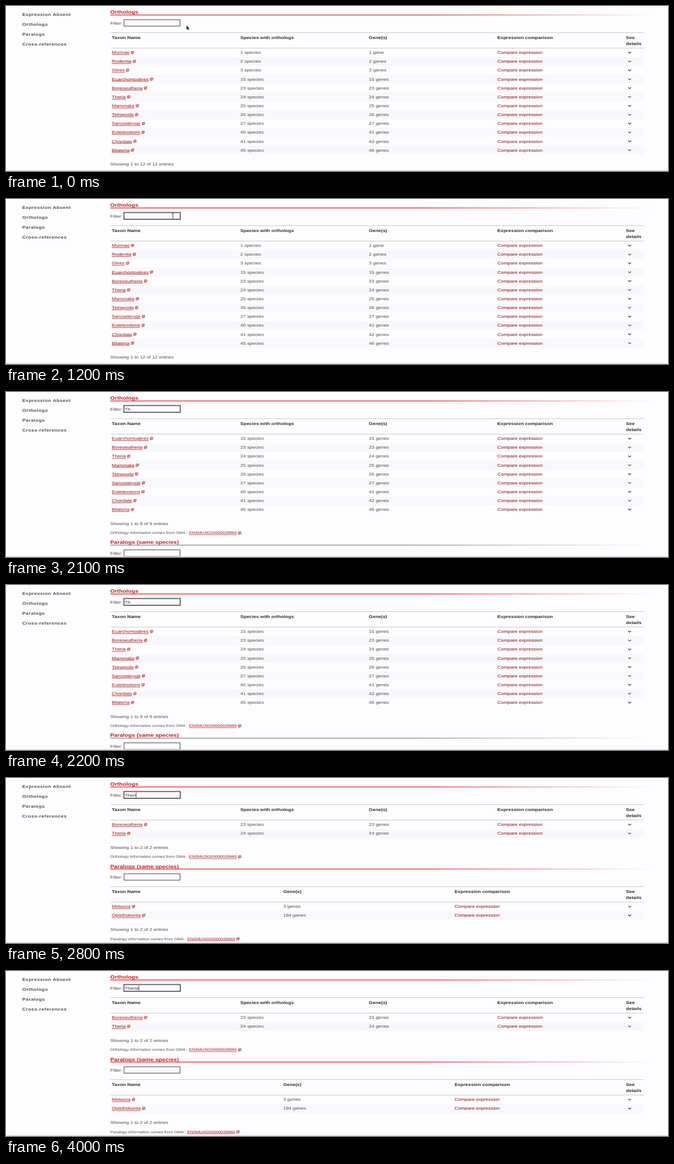
Animation of 1200x300 px, one loop 4.1 s. Source, as an HTML page:

```html
<!DOCTYPE html>
<html lang="en">
<head>
<meta charset="utf-8">
<title>Ortholog filter</title>
<style>
  html, body { margin: 0; width: 100%; height: 100%; overflow: hidden; background: #fdfcfe; }
  svg { display: block; width: 1200px; height: 300px; }
  text { font: 7.4px "Liberation Sans", Arial, sans-serif; fill: #4d4b4e; text-rendering: geometricPrecision; white-space: pre; }
  .head { font-weight: bold; fill: #2b292c; }
  .side { font-weight: bold; letter-spacing: .4px; }
  .title { font-weight: bold; font-size: 8.9px; fill: #c0201f; }
  .link { fill: #9c1216; text-decoration: underline; }
  .compare { fill: #7c0a10; }
  .small { font-size: 6.45px; }
  .typed { fill: #333; }
</style>
</head>
<body>
<svg viewBox="0 0 1200 300">
  <defs>
    <linearGradient id="red" gradientUnits="userSpaceOnUse" x1="189" x2="1172">
      <stop offset=".58" stop-color="#d8242a"/><stop offset="1" stop-color="#d8242a" stop-opacity="0"/>
    </linearGradient>
    <linearGradient id="gray" gradientUnits="userSpaceOnUse" x1="189" x2="1172">
      <stop offset=".55" stop-color="#8b8587"/><stop offset="1" stop-color="#8b8587" stop-opacity="0"/>
    </linearGradient>
    <g id="icon" fill="none" stroke="#a8383b" stroke-width=".75">
      <path d="M1.6 .5H5.4V4H1.6ZM1.6 1.6H.4V5.1H4.2V4M2.5 3.2L4.3 1.5M2.9 1.5H4.3V2.9"/>
    </g>
    <path id="chevron" d="M-2.7 -1.1L0 1.1L2.7 -1.1" fill="none" stroke="#333" stroke-width="1.1"/>
    <path id="arrow" d="M0 0V8L2 6.6L3.2 9.2L4.7 8.7L3.6 6.1H6Z" fill="#111" stroke="#fff" stroke-width=".5"/>
    <path id="beam" d="M-2 -4H-.7L0 -3.4L.7 -4H2M0 -3.4V3.4M-2 4H-.7L0 3.4L.7 4H2" fill="none" stroke="#222" stroke-width=".9"/>
  </defs>
  <g id="scene"></g>
</svg>
<script>
const LOOP = 4100, STEP = 100, WIDE = 1.2, ROW = 16.13;
const scene = document.getElementById('scene');
const pen = document.createElement('canvas').getContext('2d');
pen.font = '100px "Liberation Sans", Arial, sans-serif';

const taxa = [
  ['Murinae', 1, 1], ['Rodentia', 2, 2], ['Glires', 3, 3], ['Euarchontoglires', 15, 15],
  ['Boreoeutheria', 23, 23], ['Theria', 24, 24], ['Mammalia', 25, 25], ['Tetrapoda', 26, 26],
  ['Sarcopterygii', 27, 27], ['Euteleostomi', 40, 41], ['Chordata', 41, 42], ['Bilateria', 45, 46]
].map(([name, species, genes]) =>
  [name, species + ' species', genes + (genes > 1 ? ' genes' : ' gene'), 'Compare expression']);
const paralogs = [['Metazoa', '3 genes', 'Compare expression'], ['Opisthokonta', '184 genes', 'Compare expression']];

// [start, typed text, matching rows]
const typing = [
  [0, '', taxa],
  [2000, 'T', taxa],
  [2100, 'Th', taxa.slice(3)],
  [2400, 'The', [4, 5, 9, 10, 11].map(i => taxa[i])],
  [2600, 'Ther', [4, 5, 9, 10, 11].map(i => taxa[i])],
  [2800, 'Theri', taxa.slice(4, 6)],
  [2900, 'Theria', taxa.slice(4, 6)]
];
// [start, shape, x, y]
const pointer = [
  [0, 'arrow', 327, 35.2], [100, 'arrow', 320, 34], [200, 'beam', 309, 31],
  [500, 'beam', 302.5, 30.2], [2000, '', 0, 0]
];
const at = (list, t) => list.filter(e => e[0] <= t).pop();

const width = (s, size = 7.4) => pen.measureText(s).width * size / 100 * WIDE;
const text = (x, y, s, cls = '') => `<text class="${cls}" transform="matrix(${WIDE} 0 0 1 ${x} ${y})">${s}</text>`;
const use = (id, x, y) => `<use href="#${id}" x="${x}" y="${y}"/>`;
const rect = (x, y, w, h, fill, more = '') => `<rect x="${x}" y="${y}" width="${w}" height="${h}" fill="${fill}" ${more}/>`;

function info(y, kind) {
  const lead = kind + ' information comes from OMA : ', id = 'ENSMUSG00000028969';
  const x = 189 + width(lead, 6.45), end = x + width(id, 6.45);
  return text(189, y, lead, 'small') + text(x, y, id, 'link small') +
    use('icon', end + 2.2, y - 5) + text(end + 8, y, '.', 'small');
}

function section(top, title, kind, heads, rows, line, input) {
  const pitch = 932 / heads.length, count = rows.length;
  let out = text(189, top + 14.4, title, 'title') + rect(189, top + 15.7, 983, 1.3, `url(#${line})`);
  out += text(189, top + 33.7, 'Filter:');
  if (input.focus) out += rect(213.4, top + 24.3, 102.7, 12.9, 'none', 'stroke="#8d8b92" stroke-width="1.6"');
  out += rect(214, top + 24.9, 101.5, 11.7, '#fdfcfe', 'stroke="#3a383c" stroke-width="1"');
  out += text(215.2, top + 33.7, input.value, 'typed');
  if (input.caret) out += rect(215.4 + width(input.value), top + 26.4, .8, 8.8, '#222');

  out += rect(189.5, top + 48, 967, .8, '#bdbbbe') + rect(189.5, top + 76.2, 967, .8, '#bdbbbe');
  heads.forEach((h, i) => out += text(191.8 + i * pitch, top + 59.8, h, 'head'));
  out += text(1123.8, top + 59.8, 'See', 'head') + text(1123.8, top + 70.9, 'details', 'head');

  rows.forEach((row, r) => {
    const y = top + 87.2 + r * ROW;
    if (r % 2) out += rect(189.5, y - 10.5, 967, ROW, '#f8f7f9');
    row.forEach((cell, i) => {
      const cls = i === 0 ? 'link' : i === row.length - 1 ? 'compare' : '';
      out += text(191.8 + i * pitch, y, cell, cls);
    });
    out += use('icon', 194.2 + width(row[0]), y - 5.4) + use('chevron', 1130.4, y - 2.6);
  });
  const foot = top + 96.4 + count * ROW;
  return out + text(189, foot, `Showing 1 to ${count} of ${count} entries`) + info(foot + 16.8, kind);
}

function draw(t) {
  const [, value, rows] = at(typing, t);
  const [, shape, px, py] = at(pointer, t);
  const caret = t >= 2800 && (t - 2900) % 1000 < 500;
  let out = ['Expression', 'Expression Absent', 'Orthologs', 'Paralogs', 'Cross-references']
    .map((s, i) => text(29.4, -.8 + i * 18.3, s, 'side')).join('');
  out += section(0, 'Orthologs', 'Orthology',
    ['Taxon Name', 'Species with orthologs', 'Gene(s)', 'Expression comparison'],
    rows, 'red', { value, caret, focus: t >= 1100 });
  out += section(116.9 + rows.length * ROW, 'Paralogs (same species)', 'Paralogy',
    ['Taxon Name', 'Gene(s)', 'Expression comparison'],
    paralogs, rows.length > 2 ? 'gray' : 'red', { value: '' });
  out += rect(0, 298.6, 1200, 1.4, '#fdfcfe') + rect(0, 298.6, 1200, .9, '#c4c2c5');
  if (shape) out += use(shape, px, py);
  scene.innerHTML = out;
}

let last = -1;
function tick() {
  const t = Math.floor(performance.now() % LOOP / STEP) * STEP;
  if (t !== last) draw(last = t);
  requestAnimationFrame(tick);
}
tick();
</script>
</body>
</html>
```
